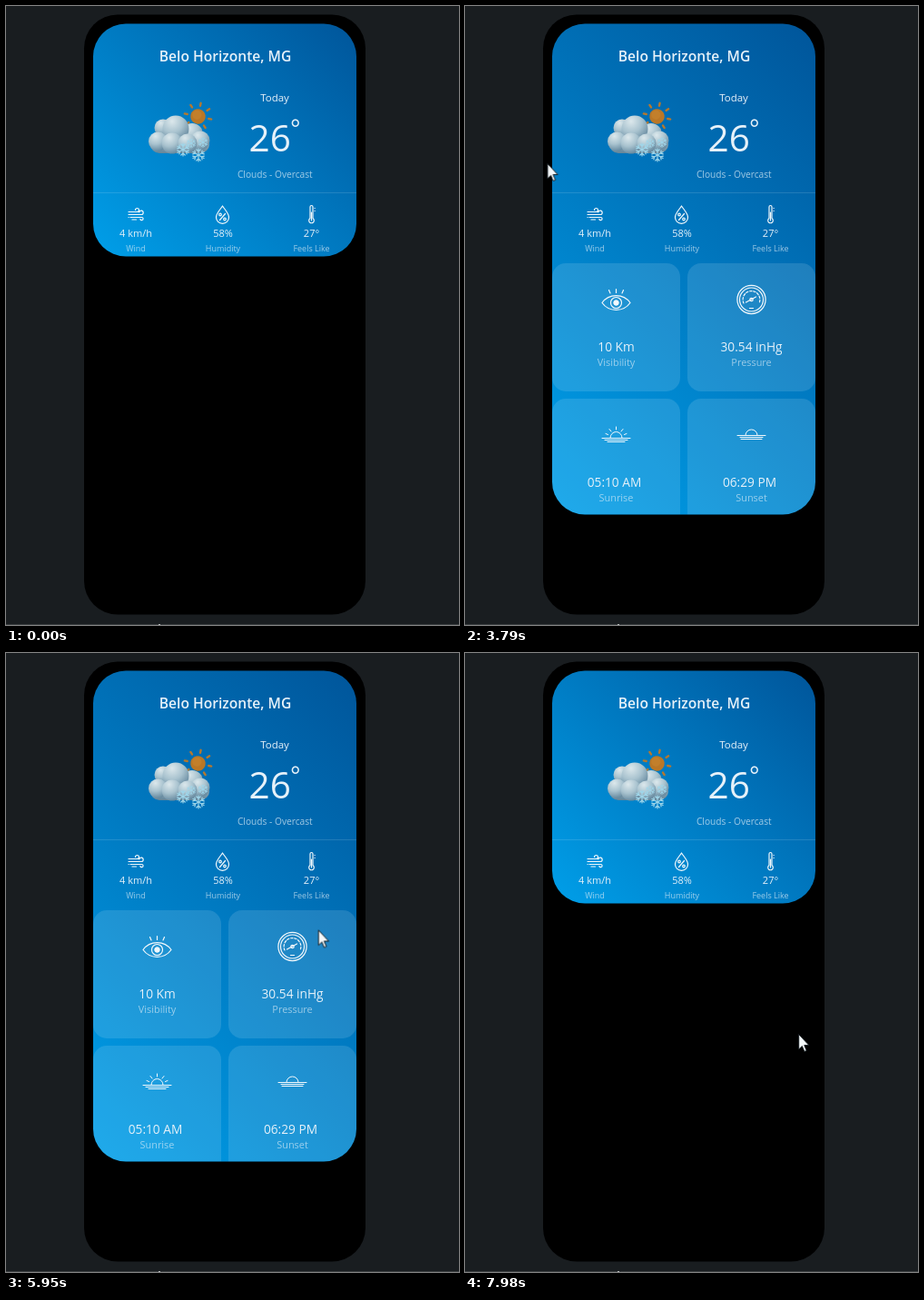
Write an HTML page that moves like this. It is 499 px wide and 681 px high and loops after 8000 ms.

```html
<!DOCTYPE html>
<html lang="en">
<head>
<meta charset="utf-8">
<title>Weather card</title>
<style>
  html, body { margin: 0; width: 100%; height: 100%; overflow: hidden; background: #191d20; }
  .stage { position: relative; width: 499px; height: 681px; overflow: hidden; background: #191d20; }
  .stage > * { position: absolute; }
  .phone {
    left: 86px; top: 10px; width: 310px; height: 660px; border-radius: 37px; background: #000;
    transform: translateY(-.5px);
  }
  .card {
    position: absolute; left: 10px; top: 10px; width: 290px; height: 256px; border-radius: 36px; overflow: hidden;
    background: linear-gradient(45deg, #009fe9, #00559a);
    animation: grow 8s linear infinite;
  }
  .card svg { position: absolute; left: 0; top: 0; }
  .thumb {
    position: absolute; left: 280px; top: 263px; width: 8px; height: 290px; border-radius: 4px;
    background: rgba(255, 255, 255, .38); animation: thumb 8s step-end infinite;
  }
  .floor { left: 0; top: 680px; width: 499px; height: 1px; background: #393d3f; }
  .floor::after { content: ""; position: absolute; left: 168px; width: 2px; height: 1px; background: #b8bbbc; }
  .cursor { left: -1px; top: 0; animation: point 8s linear infinite; }

  text { font-family: "Open Sans", "Noto Sans", sans-serif; text-anchor: middle; fill: #e6f1f9; }
  .title { font-size: 15.6px; font-weight: 600; }
  .day { font-size: 11.5px; }
  .temp { font-size: 40.5px; }
  .deg { font-size: 27px; }
  .sky { font-size: 10.2px; opacity: .7; }
  .stat { font-size: 11px; }
  .stat-name { font-size: 9px; opacity: .68; }
  .fact { font-size: 13.7px; }
  .fact-name { font-size: 10.9px; opacity: .62; }
  .icon { fill: none; stroke: #f2f8fc; stroke-width: 1.2; stroke-linecap: round; stroke-linejoin: round; }
  .tile { fill: #fff; fill-opacity: .12; }

  @keyframes grow {
    0% { height: 256px; }
    25.31% { height: 256px; animation-timing-function: ease; }
    32.81% { height: 540px; }
    47.44% { height: 540px; animation-timing-function: ease; }
    54.94% { height: 256px; }
    65.34% { height: 256px; animation-timing-function: ease; }
    72.84% { height: 540px; }
    75.81% { height: 540px; animation-timing-function: ease; }
    83.31%, 100% { height: 256px; }
  }
  @keyframes thumb {
    0% { opacity: 0; }
    75.9% { opacity: 1; }
    83.3%, 100% { opacity: 0; }
  }
  @keyframes point {
    0%, 8.24% { transform: translate(510px, 690px); }
    8.25%, 9.11% { transform: translate(496px, 677px); }
    9.12%, 14.98% { transform: translate(510px, 270px); }
    15% { transform: translate(495px, 256px); }
    18.1% { transform: translate(481px, 172px); }
    21.6% { transform: translate(440px, 119px); }
    25% { transform: translate(396px, 106px); }
    25.9% { transform: translate(380px, 107px); }
    29.25% { transform: translate(337px, 114px); }
    35.1% { transform: translate(254px, 125px); }
    45.6% { transform: translate(129px, 164px); }
    47.4% { transform: translate(91px, 173px); }
    51.25% { transform: translate(58px, 181px); }
    55.25% { transform: translate(36px, 184px); }
    56.5% { transform: translate(28px, 189px); }
    61.25% { transform: translate(45px, 212px); }
    65.3% { transform: translate(96px, 232px); }
    67.5% { transform: translate(136px, 249px); }
    71.5% { transform: translate(260px, 287px); }
    75.8% { transform: translate(386px, 313px); }
    76.9% { transform: translate(424px, 318px); }
    79.4% { transform: translate(448px, 323px); }
    80.6% { transform: translate(452px, 347px); }
    82.5% { transform: translate(438px, 395px); }
    83.75% { transform: translate(395px, 418px); }
    87.75% { transform: translate(215px, 450px); }
    91.6% { transform: translate(130px, 455px); }
    98% { transform: translate(321px, 443px); }
    99.7%, 100% { transform: translate(368px, 419px); }
  }
</style>
</head>
<body>
<div class="stage">
  <div class="phone">
    <div class="card">
      <svg width="290" height="540" viewBox="96 19.5 290 540">
        <defs>
          <radialGradient id="puff" cx=".36" cy=".22" r=".85">
            <stop offset="0" stop-color="#dce8ec"/>
            <stop offset=".5" stop-color="#a9c3cf"/>
            <stop offset="1" stop-color="#5d8299"/>
          </radialGradient>
          <linearGradient id="base" x2="0" y2="1">
            <stop offset="0" stop-color="#b4cad4"/>
            <stop offset="1" stop-color="#648599"/>
          </linearGradient>
          <g id="flake" fill="none" stroke="#9fd6ea" stroke-width="1.2" stroke-linecap="round">
            <path id="arm" d="M0-7V7M-2.2-6L0-4L2.2-6M-2.2 6L0 4L2.2 6"/>
            <use href="#arm" transform="rotate(60)"/>
            <use href="#arm" transform="rotate(120)"/>
          </g>
        </defs>

        <text class="title" x="241.5" y="61">Belo Horizonte, MG</text>
        <text class="day" x="296" y="105">Today</text>
        <text class="temp" x="290.7" y="160">26</text>
        <text class="deg" x="318.7" y="145">°</text>
        <text class="sky" x="296.3" y="189">Clouds - Overcast</text>

        <!-- sun, cloud and snow -->
        <g transform="translate(211.5 121.5) rotate(12)">
          <g stroke="#b3782f" stroke-width="2.4" stroke-linecap="round">
            <path id="rays" d="M0-12V-15M0 12V15M12 0H15M-12 0H-15"/>
            <use href="#rays" transform="rotate(45)"/>
          </g>
          <circle r="8.3" fill="#ba7726"/>
          <circle cx="-1.5" cy="-1.5" r="5" fill="#c88630" opacity=".6"/>
        </g>
        <g fill="url(#puff)">
          <rect x="159" y="142" width="65" height="20" rx="10" fill="url(#base)"/>
          <circle cx="205" cy="141" r="12"/>
          <circle cx="214" cy="148" r="10.5"/>
          <circle cx="173" cy="134" r="9.5"/>
          <circle cx="187" cy="135" r="14.5"/>
          <circle cx="167.5" cy="149" r="10.5"/>
          <circle cx="183" cy="151" r="11.5"/>
          <circle cx="200" cy="151" r="10.5"/>
        </g>
        <use href="#flake" transform="translate(195 158)"/>
        <use href="#flake" transform="translate(212 164)"/>
        <use href="#flake" transform="translate(217 150) scale(.75)"/>
        <use href="#flake" transform="translate(204 151) scale(.7)"/>

        <path d="M96 205.5H386" stroke="#fff" stroke-opacity=".13"/>

        <!-- wind -->
        <path class="icon" stroke-width="1" d="M135 226.5H144.5a2 2 0 1 0-2-2M135 229.5H149a2.2 2.2 0 1 0-2.2-2.6M137 232.5H149.5a1.6 1.6 0 1 1-1.6 1.8M135 232.5h.2M139 235H143.5"/>
        <text class="stat" x="143" y="254">4 km/h</text>
        <text class="stat-name" x="143" y="270">Wind</text>

        <!-- humidity -->
        <g class="icon">
          <path d="M238.5 220C236 224 231.5 228 231.5 232.5A7 6.8 0 0 0 245.5 232.5C245.5 228 241 224 238.5 220Z"/>
          <path d="M241.5 228.5L235.5 235.5"/>
          <circle cx="236" cy="229.5" r="1.3"/>
          <circle cx="241" cy="234.5" r="1.3"/>
        </g>
        <text class="stat" x="239" y="254">58%</text>
        <text class="stat-name" x="239" y="270">Humidity</text>

        <!-- thermometer -->
        <g class="icon" stroke-width=".8">
          <path d="M335 221a1.5 1.5 0 0 1 3 0V233.6a2.8 2.8 0 1 1-3 0Z"/>
          <path d="M336.5 227V236M340 222.5h.2M340 225.5h.2"/>
        </g>
        <text class="stat" x="336.5" y="254">27°</text>
        <text class="stat-name" x="336.5" y="270">Feels Like</text>

        <g class="tile">
          <rect x="96" y="283" width="141" height="141" rx="15"/>
          <rect x="245" y="283" width="141" height="141" rx="15"/>
          <rect x="96" y="432" width="141" height="141" rx="15"/>
          <rect x="245" y="432" width="141" height="141" rx="15"/>
        </g>

        <!-- visibility -->
        <g class="icon" transform="translate(166.5 326.5)">
          <path d="M-15.5 0C-8-10.5 8-10.5 15.5 0C8 10.5-8 10.5-15.5 0Z"/>
          <circle r="6"/>
          <circle r="2.6" fill="#f2f8fc"/>
          <path d="M0-15V-11M-8-14L-6.5-10.5M8-14L6.5-10.5"/>
        </g>
        <text class="fact" x="166.5" y="380">10 Km</text>
        <text class="fact-name" x="166.5" y="396">Visibility</text>

        <!-- pressure -->
        <g class="icon" transform="translate(315.5 323)">
          <circle r="15.6"/>
          <circle r="13"/>
          <path d="M-8.5 4A9.4 9.4 0 1 1 8.5 4" stroke-dasharray="2.4 1.8"/>
          <path d="M-6 3L5-3M-2 9.5H2"/>
          <circle r="1.7"/>
        </g>
        <text class="fact" x="315.5" y="380">30.54 inHg</text>
        <text class="fact-name" x="315.5" y="396">Pressure</text>

        <!-- sunrise -->
        <g class="icon" style="stroke-width: 1">
          <path d="M151 475.5H182M154 477.5H179M157 479.5H176M160 475A6.5 6.5 0 0 1 173 475"/>
          <path d="M166.5 463V466M159 465.5L161 468M174 465.5L172 468M155 470.5L157.5 471.5M178 470.5L175.5 471.5"/>
        </g>
        <text class="fact" x="164.5" y="528.5">05:10 AM</text>
        <text class="fact-name" x="166.5" y="545">Sunrise</text>

        <!-- sunset -->
        <path class="icon" style="stroke-width: 1" d="M300 472.5H331M303 474.5H328M304 476.5H327M309 472A6.5 6 0 0 1 322 472"/>
        <text class="fact" x="313.5" y="528.5">06:29 PM</text>
        <text class="fact-name" x="315.5" y="545">Sunset</text>
      </svg>
      <div class="thumb"></div>
    </div>
  </div>
  <div class="floor"></div>
  <svg class="cursor" width="15" height="22" viewBox="0 0 14 21">
    <path d="M.5.5V16.2L4 12.9L6.4 18.6L8.7 17.6L6.3 12H11.2Z" fill="#f4f8fa" stroke="#10181c" stroke-width=".9"/>
  </svg>
</div>
</body>
</html>
```
